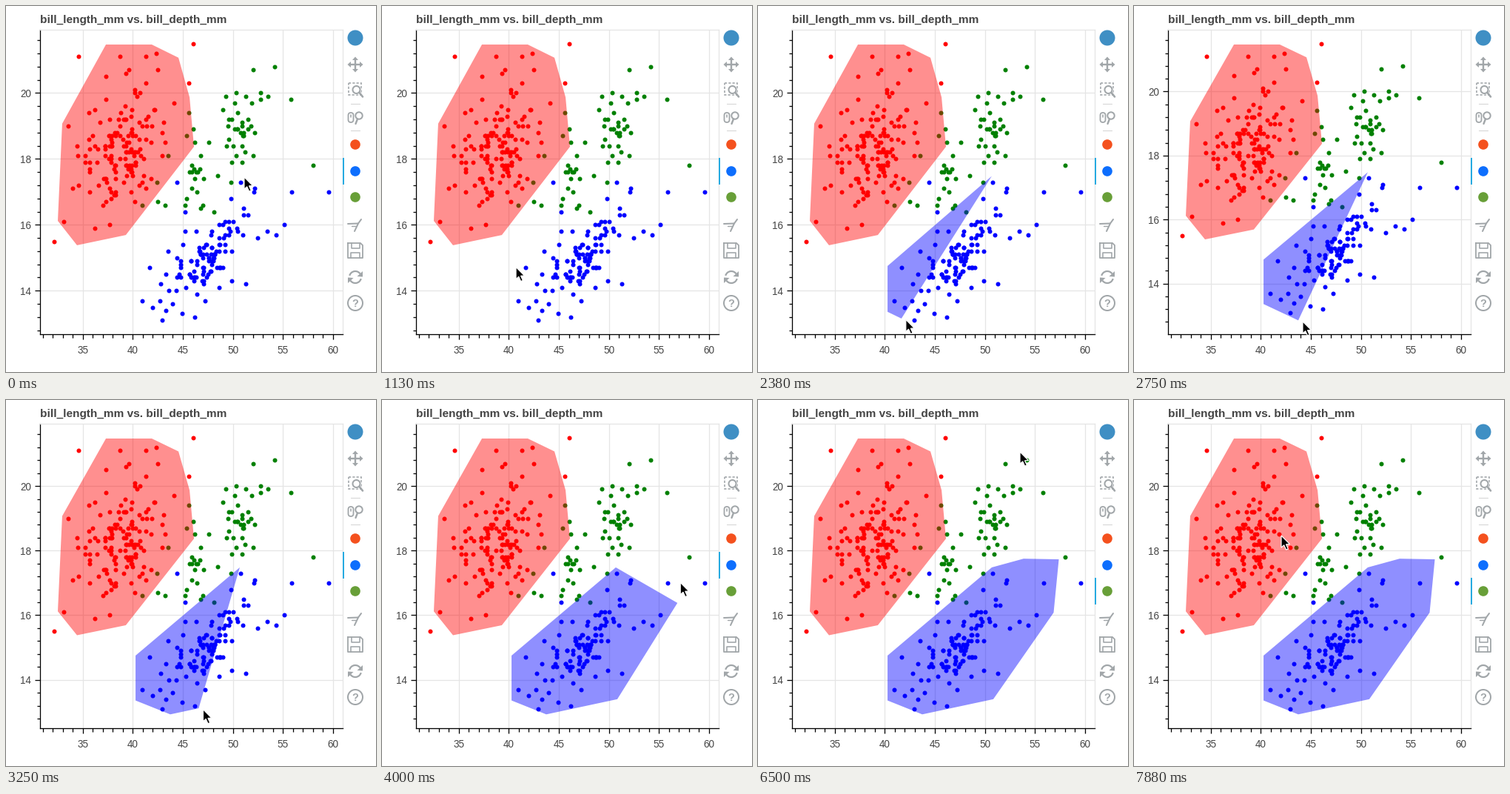
These frames come from a looping animation (500 px wide and 494 px high, 8 s). A matplotlib script:

```python
import numpy as np
import matplotlib.pyplot as plt
from matplotlib.animation import FuncAnimation
from matplotlib.patches import Arc, Circle, FancyBboxPatch, Polygon, Rectangle
from matplotlib.ticker import MultipleLocator

W, H, DPI = 500, 494, 64
PT = 72 / DPI                              # points per pixel
LEFT, RIGHT, TOP, BOTTOM = 46, 455, 32, 443
X_MIN, X_MAX, Y_MIN, Y_MAX = 32.1, 59.6, 13.1, 21.5
FRAMES, INTERVAL = 64, 125
GRAY, PALE = "#a1a6a9", "#e5e5e5"

plt.rcParams["font.family"] = "Liberation Sans"
rng = np.random.default_rng(11)


def padded(lo, hi):
    pad = 0.05 * (hi - lo)
    return lo - pad, hi + pad


def cloud(n, center, spread, slope, keep):
    """Random points around a sloped line, rounded like measurements."""
    out = []
    while len(out) < n:
        dx = rng.normal(0, spread[0])
        x = round(center[0] + dx, 1)
        y = round(center[1] + slope * dx + rng.normal(0, spread[1]), 1)
        if keep(x, y):
            out.append((x, y))
    return out


# Outlying measurements are given; the dense middle is sampled.
adelie = [
    (46.0, 21.5), (34.6, 21.1), (38.7, 21.1), (42.3, 21.2), (41.3, 21.1),
    (42.5, 20.7), (39.6, 20.7), (39.3, 20.6), (37.3, 20.5), (45.6, 20.3),
    (41.3, 20.3), (40.2, 20.1), (44.1, 19.7), (32.1, 15.5), (33.1, 16.1),
    (36.2, 15.9), (37.7, 16.0), (33.5, 19.0), (34.4, 18.4), (34.5, 18.1),
    (34.0, 17.1), (34.6, 17.2), (43.2, 18.5), (42.9, 18.1), (42.2, 19.5),
    (43.1, 19.1), (41.1, 17.5), (36.2, 19.5)]
adelie += cloud(
    122, (38.7, 18.2), (2.0, 0.9), 0.12,
    lambda x, y: 35 < x < 43 and 16.4 < y < 20.1
    and y > 16.1 + 0.394 * (x - 39.3) and y < 19 + 0.35 * (x - 34))

chinstrap = [
    (54.2, 20.8), (52.0, 20.7), (55.8, 19.8), (53.5, 19.9), (52.8, 20.0),
    (52.8, 19.8), (51.3, 19.9), (50.3, 20.0), (49.3, 19.9), (49.0, 19.5),
    (50.2, 19.7), (50.5, 19.4), (51.9, 19.7), (51.5, 19.2), (52.2, 18.8),
    (58.0, 17.8), (52.0, 18.1), (51.2, 18.2), (50.9, 17.9), (49.9, 17.9),
    (49.8, 17.3), (48.5, 17.5), (49.5, 19.0), (49.6, 18.6), (45.6, 19.4),
    (46.0, 18.9), (45.4, 18.7), (40.9, 16.6), (42.5, 16.7), (43.2, 16.6),
    (42.4, 17.3), (43.5, 18.1), (45.2, 16.6), (46.8, 16.5), (48.1, 16.4),
    (47.0, 16.6)]
chinstrap += cloud(17, (50.7, 18.8), (0.7, 0.4), 0.1,
                   lambda x, y: 49 <= x <= 52.2 and 18 < y < 19.7)
chinstrap += cloud(15, (46.3, 17.6), (0.5, 0.5), 0.2,
                   lambda x, y: 45 <= x <= 47.6 and 16.7 < y < 18.7)

gentoo = [
    (59.6, 17.0), (55.9, 17.0), (52.1, 17.0), (52.2, 17.1), (50.8, 17.3),
    (44.4, 17.3), (55.1, 16.0), (54.3, 15.7), (53.4, 15.8), (52.5, 15.6),
    (51.3, 14.2), (51.1, 16.5), (51.1, 16.3), (51.5, 16.3), (49.8, 16.8),
    (45.2, 16.4), (45.2, 15.8), (46.3, 15.8), (43.5, 15.2), (45.0, 15.4),
    (41.7, 14.7), (40.9, 13.7), (42.0, 13.5), (42.9, 13.1), (46.2, 13.2),
    (44.9, 13.3), (47.2, 13.7), (49.9, 14.3), (48.6, 14.1), (44.0, 13.6),
    (43.3, 14.5), (42.7, 13.7), (42.8, 14.2), (43.3, 13.4), (51.0, 15.7)]
gentoo += cloud(
    88, (47.2, 14.95), (1.9, 0.42), 0.27,
    lambda x, y: 43 < x < 51 and 13.6 < y < 16.4
    and abs(y - 14.95 - 0.27 * (x - 47.2)) < 0.85)

red_area = [(37.31, 21.47), (41.89, 21.47), (44.56, 21.07), (45.67, 19.87),
            (46.11, 18.37), (39.30, 15.69), (34.42, 15.38), (32.50, 16.12),
            (32.94, 19.07)]
blue_area = [(50.69, 17.48), (40.27, 14.75), (40.27, 13.36), (43.74, 12.93),
             (50.84, 13.40), (56.87, 16.08), (57.39, 17.73), (53.87, 17.75)]
clicks = np.array([0, 9, 17, 24, 29, 35, 39, 43])
DONE, SWITCH = 43, 49

# Free corner while drawing: (step, x, y) in data units
tip_path = np.array(
    [(c, *v) for c, v in zip(clicks, blue_area)]
    + [(2, 41.97, 15.36), (4, 41.97, 15.36), (11, 40.27, 14.75),
       (22, 43.74, 12.85), (32, 56.85, 16.38)])
tip_path = tip_path[tip_path[:, 0].argsort()]
# Pointer after drawing: (step, x, y) in pixels
free_path = np.array([(43, 364, 215), (44, 360, 214), (45, 359, 214),
                      (48, 469, 257), (49, 469, 257), (52, 354, 70),
                      (57, 262, 112), (63, 199, 183)])


def along(path, k):
    return tuple(np.interp(k, path[:, 0], path[:, i]) for i in (1, 2))


def to_pixels(x, y, low):
    x0, x1 = padded(X_MIN, X_MAX)
    y0, y1 = padded(low, Y_MAX)
    return (LEFT + (RIGHT - LEFT) * (x - x0) / (x1 - x0),
            BOTTOM - (BOTTOM - TOP) * (y - y0) / (y1 - y0))


fig = plt.figure(figsize=(W / DPI, H / DPI), dpi=DPI, facecolor="white")

# Plot
ax = fig.add_axes([LEFT / W, 1 - BOTTOM / H,
                   (RIGHT - LEFT) / W, (BOTTOM - TOP) / H])
ax.set_xlim(*padded(X_MIN, X_MAX))
ax.set_axisbelow(True)
ax.grid(color=PALE, lw=1.3 * PT)
for axis, major, minor in ((ax.xaxis, 5, 1), (ax.yaxis, 2, 0.4)):
    axis.set_major_locator(MultipleLocator(major))
    axis.set_minor_locator(MultipleLocator(minor))
ax.tick_params(which="major", length=7 * PT, width=1.3 * PT,
               labelsize=13.5 * PT, labelcolor="#444444")
ax.tick_params(which="minor", length=4.5 * PT, width=1.3 * PT)
ax.tick_params(axis="x", pad=8 * PT)
ax.tick_params(axis="y", pad=5 * PT)
ax.yaxis.set_major_formatter("{x:.0f}")
for side, color in (("top", PALE), ("right", PALE),
                    ("left", "black"), ("bottom", "black")):
    ax.spines[side].set(color=color, linewidth=1.3 * PT)
for points, color in ((adelie, "red"), (chinstrap, "green"),
                      (gentoo, "blue")):
    ax.scatter(*zip(*points), s=(6 * PT) ** 2, color=color, lw=0, zorder=3)
ax.add_patch(Polygon(red_area, fc="red", alpha=0.44, lw=0, zorder=4))
blue = ax.add_patch(Polygon(blue_area, fc="blue", alpha=0.44, lw=0, zorder=4))

# Pixel layer for title, toolbar and pointer
ui = fig.add_axes([0, 0, 1, 1])
ui.set(xlim=(0, W), ylim=(H, 0))
ui.axis("off")


def line(points, lw=2, color=GRAY, **kw):
    ui.plot(*zip(*points), color=color, lw=lw * PT,
            solid_capstyle="round", solid_joinstyle="round", **kw)


def ring(x, y, r, lw=2):
    ui.add_patch(Circle((x, y), r, fill=False, ec=GRAY, lw=lw * PT))


def disc(x, y, r, color):
    ui.add_patch(Circle((x, y), r, fc=color, lw=0))


def shape(points):
    ui.add_patch(Polygon(points, fc=GRAY, lw=0))


ui.text(46, 22.5, "bill_length_mm vs. bill_depth_mm", size=15.4 * PT,
        weight="bold", color="#444444", va="baseline")

CX = 472
disc(CX, 43, 10.5, "#3f8fc4")

# Pan
for ux, uy in ((1, 0), (-1, 0), (0, 1), (0, -1)):
    tx, ty = CX + 10.5 * ux, 79 + 10.5 * uy
    line([(CX, 79), (CX + 7 * ux, 79 + 7 * uy)], 2.4)
    shape([(tx, ty), (tx - 4.5 * ux + 4 * uy, ty - 4.5 * uy + 4 * ux),
           (tx - 4.5 * ux - 4 * uy, ty - 4.5 * uy - 4 * ux)])

# Box zoom
ui.add_patch(Rectangle((462.5, 103.5), 17, 16, fill=False, ec=GRAY,
                       lw=1.6 * PT, ls=(0, (2, 1.3))))
disc(473.5, 113, 6.5, "white")
ring(473.5, 113, 5)
line([(477.5, 117), (482, 122.5)], 2.6)

# Wheel zoom
ui.add_patch(FancyBboxPatch((462.5, 144), 7, 13,
                            boxstyle="round,pad=0,rounding_size=3.5",
                            fill=False, ec=GRAY, lw=1.8 * PT))
line([(466, 147), (466, 150)], 1.6)
ring(477, 148, 4.7)
line([(475, 152.5), (472.5, 159)], 2.4)

for y in (132, 168):
    line([(466, y), (478, y)], 1.2, "#d8d8d8")

for y, color in ((187, "#f4511e"), (223, "#0d6efd"), (258, "#689f38")):
    disc(CX, y, 6.8, color)

# Edit
line([(462, 294), (476, 293.5), (480, 288)], 2)
line([(476, 293.5), (471, 304)], 2)
line([(467, 296.5), (473, 296.5)], 1.4)

# Save
line([(462, 320), (479, 320), (482, 323), (482, 340), (462, 340),
      (462, 320)], 1.8)
line([(466.5, 320), (466.5, 327), (477.5, 327), (477.5, 320)], 1.6)
line([(466, 340), (466, 333), (478, 333), (478, 340)], 1.6)

# Reset
for a in (195, 15):
    ui.add_patch(Arc((CX, 366), 16, 16, theta1=a, theta2=a + 130,
                     ec=GRAY, lw=2.2 * PT))
shape([(482, 358), (482, 365.5), (474.5, 365)])
shape([(462, 374), (462, 366.5), (469.5, 367)])

# Help
ring(CX, 401, 10)
ui.text(CX, 406.2, "?", size=14.5 * PT, weight="bold", color=GRAY,
        ha="center", va="baseline")

marker = ui.add_patch(Rectangle((455, 205), 2.2, 36, fc="#26aae1", lw=0))
arrow = np.array([(0, 0), (0, 16.2), (3.7, 12.8), (6.6, 19.2), (9.3, 18),
                  (6.5, 11.8), (11.5, 11.6)])
pointer = ui.add_patch(Polygon(arrow, fc="black", ec="white", lw=1.2 * PT,
                               zorder=10))


def draw(k):
    corners = blue_area[:int(np.sum(clicks <= k))]
    tip = along(tip_path, k)
    if k < DONE:
        corners = corners + [tip]
    blue.set_visible(len(corners) > 2)
    blue.set_xy(corners)

    low = min([Y_MIN] + [y for _, y in corners])
    ax.set_ylim(*padded(low, Y_MAX))

    if k < DONE:
        px, py = to_pixels(*tip, low)
        lead = np.interp(k, [30, 32, 34], [0, 1, 0])
        spot = px + 6 - 2 * lead, py + 1.5 - 29 * lead
    else:
        spot = along(free_path, k)
    pointer.set_xy(arrow + spot)
    marker.set_y(205 if k < SWITCH else 240)
    return blue, pointer, marker


anim = FuncAnimation(fig, draw, frames=FRAMES, interval=INTERVAL,
                     repeat=True, repeat_delay=0, blit=False)
plt.show()
```
